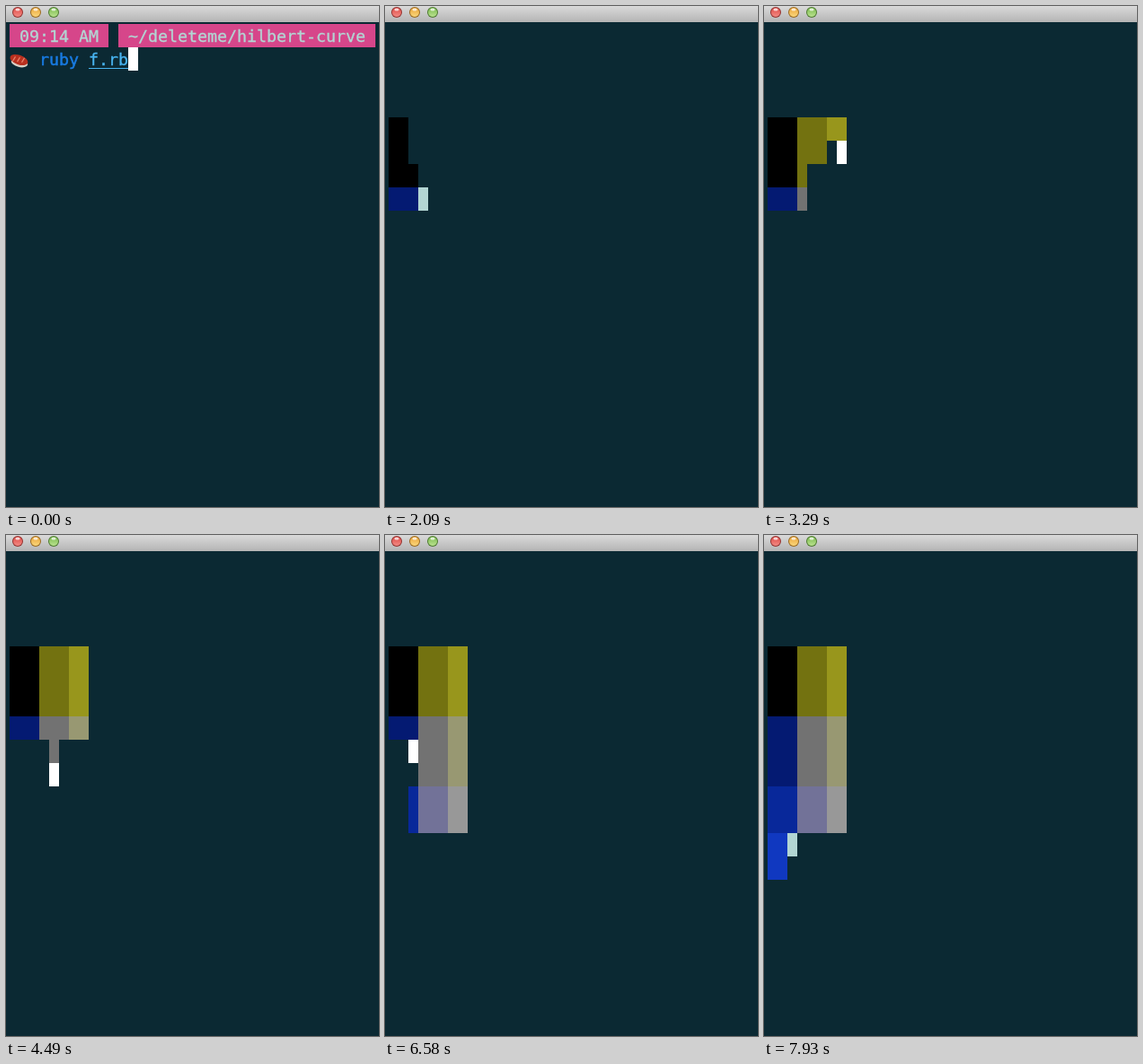
Recreate the animation shown at these times as an HTML page with a canvas. Size 415x558 px, loop 8 s.

```html
<!DOCTYPE html>
<html lang="en">
<head>
<meta charset="utf-8">
<title>Hilbert curve in a terminal</title>
<style>
  html, body { margin: 0; width: 100%; height: 100%; overflow: hidden; background: #0b2933; }
  canvas { display: block; }
</style>
</head>
<body>
<canvas id="stage" width="415" height="558"></canvas>
<script>
const ctx = document.getElementById('stage').getContext('2d');
const W = 415, H = 558, LOOP = 8000;
const CELL_W = 11, CELL_H = 26, LEFT = 4, TOP = 20, GRID_ROW = 4;
const GRID = 16;
const RUN_AT = 1200;          // the command starts
const FIRST_CELL = 1073, CELL_MS = 100.6;
const PALE = '#b2d5d3';

const LEVELS = [0, 114, 152, 185, 220, 255];
const BLUES = ['#000000', '#041a72', '#08289a', '#1038c0'];
const GOLDS = ['#000000', '#737210', '#98961c'];

function rect(x, y, w, h, color) {
  ctx.fillStyle = color;
  ctx.fillRect(x, y, w, h);
}

function block(col, row, cols, color) {
  rect(LEFT + col * CELL_W, TOP + row * CELL_H, cols * CELL_W, CELL_H, color);
}

function label(str, col, row, color, weight = 0.35) {
  const x = LEFT + col * CELL_W, y = TOP + row * CELL_H + 20;
  ctx.font = '18.27px "DejaVu Sans Mono", monospace';
  ctx.fillStyle = ctx.strokeStyle = color;
  ctx.lineWidth = weight;
  ctx.fillText(str, x, y);
  ctx.strokeText(str, x, y);
}

function ellipse(x, y, rx, ry, angle, color) {
  ctx.fillStyle = color;
  ctx.beginPath();
  ctx.ellipse(x, y, rx, ry, angle, 0, Math.PI * 2);
  ctx.fill();
}

function button(x, edge, base, glow) {
  const g = ctx.createLinearGradient(0, 1, 0, 13);
  g.addColorStop(0, base);
  g.addColorStop(1, glow);
  ellipse(x, 7, 6, 6, 0, edge);
  ellipse(x, 7, 5, 5, 0, g);
  ellipse(x, 4, 2.6, 1.5, 0, 'rgba(255,255,255,0.75)');
}

function titleBar() {
  const g = ctx.createLinearGradient(0, 0, 0, 18);
  g.addColorStop(0, '#dadada');
  g.addColorStop(1, '#b4b4b4');
  rect(0, 0, W, 18, g);
  button(13, '#93322f', '#dc4743', '#f59089');
  button(33, '#9a6a20', '#e9a034', '#fbdc82');
  button(53, '#4d7a30', '#75b648', '#c0e795');
}

function sushi() {
  ellipse(15, 63, 9.5, 5, 0.25, '#d8cfc4');
  ellipse(14.5, 60, 10.5, 5.2, 0.35, '#b8301f');
  ctx.strokeStyle = '#e8816a';
  ctx.lineWidth = 1.2;
  for (const x of [9, 14, 19]) {
    ctx.beginPath();
    ctx.moveTo(x + 1.5, 55 + x * 0.15);
    ctx.lineTo(x - 1.5, 60 + x * 0.15);
    ctx.stroke();
  }
}

function prompt() {
  const pink = '#d6468a';
  block(0, 0, 10, pink);
  block(11, 0, 26, pink);
  label('09:14 AM', 1, 0, PALE);
  label('~/deleteme/hilbert-curve', 12, 0, PALE);
  sushi();
  label('ruby', 3, 1, '#187be2', 0.5);
  label('f.rb', 8, 1, '#48b4f0');
  rect(92, 69, 44, 1, '#48b4f0');
  block(12, 1, 1, '#ffffff');
}

// Position of step d along a Hilbert curve on a GRID x GRID board.
function hilbert(d) {
  let x = 0, y = 0;
  for (let s = 1; s < GRID; s *= 2) {
    const rx = 1 & (d >> 1), ry = 1 & (d ^ rx);
    if (!ry) {
      if (rx) { x = s - 1 - x; y = s - 1 - y; }
      [x, y] = [y, x];
    }
    x += s * rx;
    y += s * ry;
    d >>= 2;
  }
  return [x, y];
}

function cellColor(x, y) {
  const i = Math.floor(x * 6 / GRID), j = Math.floor(y * 6 / GRID);
  if (!i) return BLUES[j];
  if (!j) return GOLDS[i];
  return `rgb(${LEVELS[i]},${LEVELS[i]},${LEVELS[j]})`;
}

function curve(t) {
  const head = Math.floor((t - FIRST_CELL) / CELL_MS);
  let prevX = 0;
  for (let d = 0; d < head; d++) {
    const [x, y] = hilbert(d);
    block(x, y + GRID_ROW, 1, cellColor(x, y));
    prevX = x;
  }
  const [x, y] = hilbert(head);
  block(x, y + GRID_ROW, 1, x > prevX ? PALE : '#ffffff');
}

// The screen refreshes every 150 ms, with a 10 ms slip every 22 refreshes.
const refreshAt = k => RUN_AT + 150 * k - 10 * Math.floor((k + 16) / 22);

function lastRefresh(t) {
  let k = 0;
  while (refreshAt(k + 1) <= t) k++;
  return refreshAt(k);
}

function draw(t) {
  rect(0, 0, W, H, '#0b2933');
  titleBar();
  if (t < RUN_AT) prompt();
  else curve(lastRefresh(t));
}

const start = performance.now();
function tick() {
  draw((performance.now() - start) % LOOP);
  requestAnimationFrame(tick);
}
tick();
</script>
</body>
</html>
```
